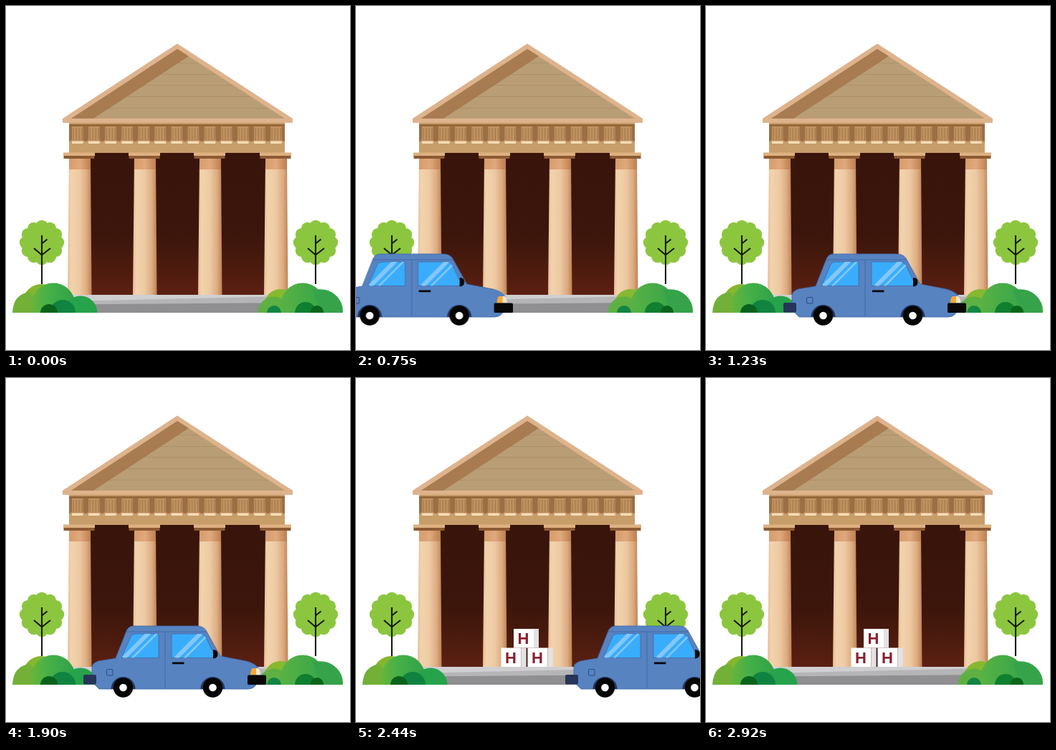
An HTML page for the animation above (3750 ms loop, 480 by 480 pixels).

```html
<!DOCTYPE html>
<html lang="en">
<head>
<meta charset="utf-8">
<title>Delivery</title>
<style>
  html, body { margin: 0; width: 100%; height: 100%; overflow: hidden; background: #fff; }
  svg { display: block; width: 100vw; height: 100vh; }
  text { font: bold 22px "Liberation Sans", Arial, sans-serif; fill: #8b1f2e; text-anchor: middle; }
  .car { animation: drive 3750ms -2ms infinite; }
  .crates { animation: unload 3750ms -2ms step-end infinite; }
  /* 30 ms ticks: roll in, wait, pull away */
  @keyframes drive {
    0% { transform: translateX(-370px); animation-timing-function: steps(41); }
    32.8% { transform: none; }
    50.6667% { transform: translateX(0); animation-timing-function: steps(3); }
    53.0667% { transform: translateX(8px); animation-timing-function: steps(4); }
    56.2667% { transform: translateX(45px); animation-timing-function: steps(27); }
    77.8667%, 100% { transform: translateX(386px); }
  }
  @keyframes unload {
    0% { visibility: hidden; }
    50.6667%, 100% { visibility: visible; }
  }
</style>
</head>
<body>
<svg viewBox="0 0 480 480">
  <defs>
    <linearGradient id="shaft">
      <stop offset="0" stop-color="#e6bd93"/>
      <stop offset=".15" stop-color="#f2d3ae"/>
      <stop offset=".5" stop-color="#edc9a2"/>
      <stop offset=".8" stop-color="#dcab80"/>
      <stop offset="1" stop-color="#bd8156"/>
    </linearGradient>
    <linearGradient id="neck">
      <stop offset="0" stop-color="#d69c6c"/>
      <stop offset=".5" stop-color="#e0a97c"/>
      <stop offset="1" stop-color="#be7f50"/>
    </linearGradient>
    <linearGradient id="hall" x2="0" y2="1">
      <stop offset="0" stop-color="#38140a"/>
      <stop offset=".58" stop-color="#3c150b"/>
      <stop offset=".72" stop-color="#45190d"/>
      <stop offset=".86" stop-color="#501c0f"/>
      <stop offset="1" stop-color="#5c2012"/>
    </linearGradient>
    <linearGradient id="leafL">
      <stop offset="0" stop-color="#68b53a"/>
      <stop offset=".4" stop-color="#44b048"/>
      <stop offset="1" stop-color="#30a148"/>
    </linearGradient>
    <linearGradient id="leafR">
      <stop offset="0" stop-color="#58b244"/>
      <stop offset="1" stop-color="#36a548"/>
    </linearGradient>
    <clipPath id="ground"><rect width="480" height="428"/></clipPath>
    <clipPath id="panes">
      <path id="glass" d="M161 390.500L174 361Q176 357 181 357H213V390.500ZM231 357H270Q276 357 279 362L291 387Q291 390.500 288 390.500H231Z"/>
    </clipPath>
    <pattern id="frieze" x="92" y="163" width="23.1" height="41" patternUnits="userSpaceOnUse">
      <path fill="#c79d6a" d="M0 0H24V41H0Z"/>
      <path fill="#96673b" d="M0 2H24V5H0Z"/>
      <path fill="#c0935f" d="M0 5H16V26H0Z"/>
      <path stroke="#a0734a" d="M2 7V25M6 7V25M10 7V25M14 7V25"/>
      <path fill="#9c6e44" d="M15.500 5H23.100V22Q23.100 26 19.300 26T15.500 22Z"/>
      <path fill="#f6dcb6" d="M0 25.500H15.500V29H0Z"/>
    </pattern>
    <g id="tree">
      <g id="crown" fill="#8cc63f"></g>
      <path d="M50 320V388M39 338L50 347.500L62 338M50 331.500L57.500 325.500" fill="none" stroke="#15190f" stroke-width="2.100"/>
    </g>
    <g id="column">
      <path fill="url(#shaft)" d="M88 213H118L119.500 403H86Z"/>
      <path fill="url(#neck)" d="M88 213H118V228H88Z"/>
      <path fill="#8c5a32" d="M80.500 208H123.500V213H80.500Z"/>
      <path fill="#deb180" d="M80 204.500H124V209H80Z"/>
    </g>
    <g id="crate">
      <path fill="#fff" d="M0 0H28V26.500H0Z"/>
      <path fill="#e3e2e5" d="M28 0H35V26.500H28Z"/>
      <text x="13.500" y="21">H</text>
    </g>
    <g id="wheel">
      <path fill="#26365c" d="M-17 2A17 17 0 0 1 17 2Z"/>
      <circle r="13.700" fill="#050505"/>
      <circle r="5.300" fill="#fff"/>
    </g>
  </defs>

  <g id="temple">
    <path fill="url(#hall)" d="M104 204H376V403H104Z"/>
    <path fill="url(#frieze)" d="M88 163H389V204H88Z"/>
    <path fill="#c79d6a" d="M88 193H389V205H88Z"/>
    <path fill="#deb38c" d="M239 52.500L400 157V163H79V157Z"/>
    <path fill="#b99d75" d="M239 60L389 157H91Z"/>
    <path fill="#a87b51" d="M239 60L255 70L122 157H91Z"/>
    <path stroke="#9c7e57" stroke-width=".7" opacity=".6" d="M210 79.500H269M186 95.500H293M163 110.500H316M139 126.500H341M114 142.500H366"/>
    <use href="#column"/>
    <use href="#column" x="91"/>
    <use href="#column" x="182"/>
    <use href="#column" x="274"/>
  </g>

  <g id="road">
    <path fill="#b5b5b7" d="M86 403H393V428H86Z"/>
    <path fill="#cfcfd1" d="M86 403H393V405L86 412Z"/>
    <path fill="#8f8f91" d="M86 416.500L393 414V428H86Z"/>
  </g>

  <use href="#tree"/>
  <use href="#tree" x="382"/>

  <g clip-path="url(#ground)">
    <circle cx="49" cy="413" r="25" fill="#86b62e"/>
    <path fill="#72b037" d="M9 428Q10 402 33 399Q44 410 50 428Z"/>
    <circle cx="66" cy="417" r="30.500" fill="url(#leafL)"/>
    <circle cx="104" cy="428" r="23.500" fill="#26a34b"/>
    <circle cx="79" cy="428" r="18" fill="#118340"/>
    <circle cx="60" cy="428" r="12" fill="#0a631d"/>

    <circle cx="383" cy="418" r="23" fill="#86b92f"/>
    <circle cx="374" cy="428" r="22.500" fill="#5fb043"/>
    <circle cx="442" cy="425" r="28" fill="#39a748"/>
    <circle cx="414" cy="417" r="30.500" fill="url(#leafR)"/>
    <path fill="#36a34a" d="M428 396Q465 390 470 428H440Z"/>
    <circle cx="374" cy="428" r="10" fill="#138543"/>
    <circle cx="418" cy="428" r="15" fill="#0f7f30"/>
    <circle cx="434" cy="427" r="9" fill="#0a661a"/>
  </g>

  <g class="crates">
    <path fill="#4a2320" d="M236 377H240V403H236Z"/>
    <use href="#crate" x="220" y="350"/>
    <use href="#crate" x="202.500" y="376.500"/>
    <use href="#crate" x="239.500" y="376.500"/>
  </g>

  <g class="car">
    <path fill="#5783c1" stroke="#4068a8" stroke-width=".8" d="M153 391L168 353Q171 346 178 346H266Q275 346 279 352L299 388L335 395Q348 398 353 406L354 416Q350 434 338 434H130L120 424V404Q120 398 129 395Z"/>
    <path fill="none" stroke="#4068a8" d="M168 354H280M222 354V433"/>
    <use href="#glass" fill="#39adfb" stroke="#4068a8" stroke-width=".8"/>
    <g clip-path="url(#panes)" stroke="#84c7f8">
      <path stroke-width="6" d="M164 391L200 355M237 391L273 355"/>
      <path stroke-width="2.500" d="M176 391L212 355M249 391L285 355"/>
    </g>
    <rect x="140.500" y="406.500" width="8.500" height="8.500" rx="1" fill="none" stroke="#2f4b80"/>
    <path fill="#080808" d="M232 396.500H248.500V399.300H232ZM289 379Q295.500 379 295.500 385T289 391.500Z"/>
    <path fill="#f7a935" d="M344 405H349V414.500H341Q341 407 344 405Z"/>
    <path fill="#f7e8cd" d="M349 405H352Q355 407 355 414.500H349Z"/>
    <rect x="108" y="414" width="18" height="13.500" rx="2" fill="#26345a"/>
    <rect x="337" y="414.500" width="26" height="13.500" rx="1.500" fill="#080808"/>
    <use href="#wheel" x="163.500" y="432"/>
    <use href="#wheel" x="288.500" y="432"/>
  </g>
</svg>
<script>
  const crown = document.getElementById('crown');
  const disc = (cx, cy, r) => {
    const c = document.createElementNS('http://www.w3.org/2000/svg', 'circle');
    Object.entries({ cx, cy, r }).forEach(([k, v]) => c.setAttribute(k, v));
    crown.append(c);
  };
  // Scalloped treetop: a disc ringed with smaller ones
  disc(50, 330, 25);
  for (let i = 0; i < 12; i++) {
    const a = i * Math.PI / 6;
    disc(50 + 22.5 * Math.cos(a), 330 + 22.5 * Math.sin(a), 8.7);
  }
</script>
</body>
</html>
```
